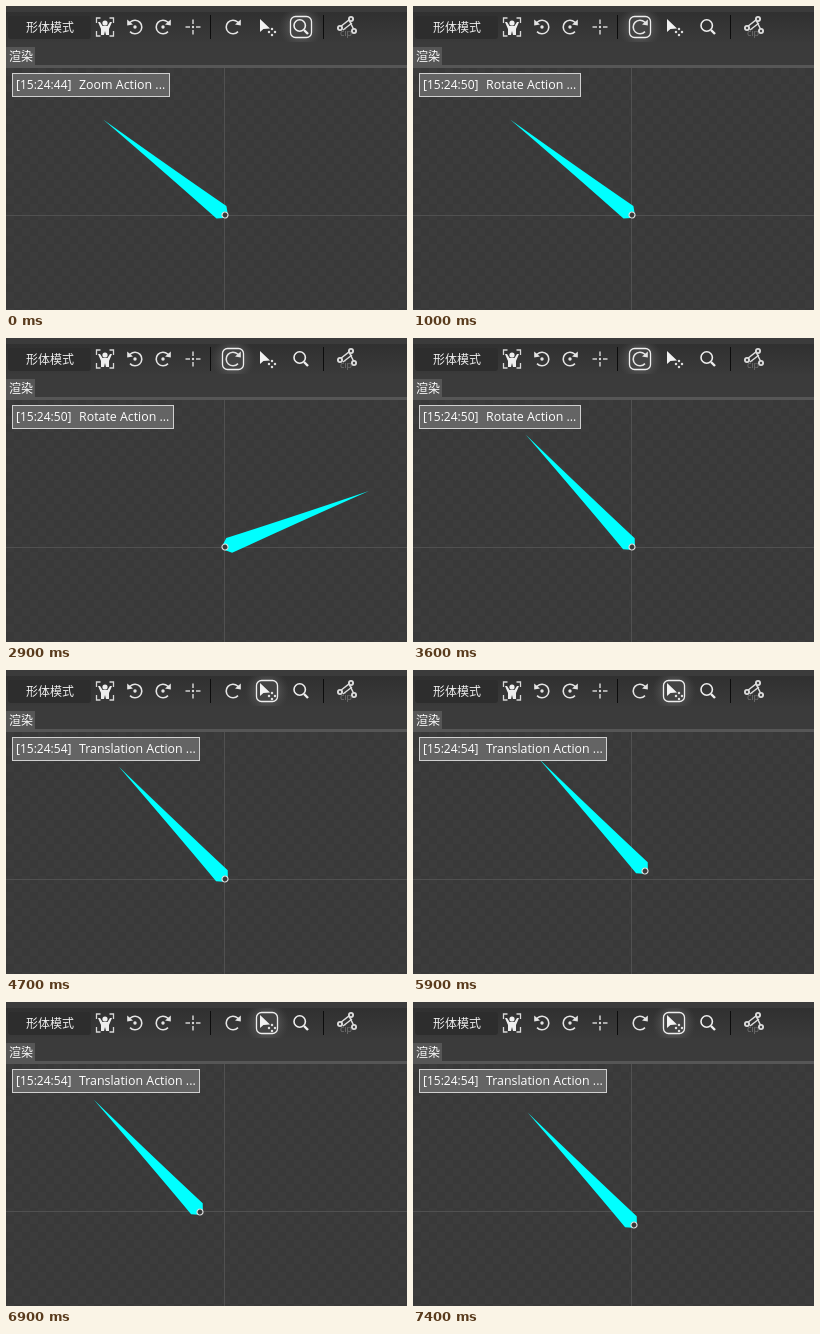
Animation, 401 px wide and 304 px high, one loop 8000 ms. Source, as an HTML page with a canvas:

```html
<!DOCTYPE html>
<html lang="zh">
<head>
<meta charset="utf-8">
<title>Bone tool</title>
<style>
html, body { margin: 0; width: 100%; height: 100%; overflow: hidden; background: #3a3a3a; }
canvas { display: block; }
</style>
</head>
<body>
<canvas id="stage" width="401" height="304"></canvas>
<script>
const ctx = document.getElementById('stage').getContext('2d');
const W = 401, H = 304, LOOP = 8000, STEP = 100;
const TOP = 62, BONE = 154.5;
const CJK = '12px "Noto Sans CJK SC", "Noto Sans CJK", sans-serif';

const modes = [
  { at: 0, stamp: '[15:24:44]', label: 'Zoom Action ...', right: 164, icon: 295 },
  { at: 1000, stamp: '[15:24:50]', label: 'Rotate Action ...', right: 168, icon: 227 },
  { at: 4700, stamp: '[15:24:54]', label: 'Translation Action ...', right: 194, icon: 261 }
];

// [time, degrees]
const turn = [[2100, 218.1], [2200, 236.4], [2900, 338.7], [3000, 338.7], [3600, 226.6]];

// [time, x, y]
const path = [
  [5800, 219, 209], [5900, 232, 201], [6000, 244, 190], [6100, 251, 175],
  [6200, 248, 159], [6300, 237, 148], [6400, 220, 143], [6500, 203, 148],
  [6600, 189, 162], [6700, 180, 182], [6800, 185, 200], [6900, 194, 210],
  [7000, 207, 212], [7100, 207, 212], [7400, 221, 223]
];

function sample(keys, t) {
  if (t <= keys[0][0]) return keys[0].slice(1);
  for (let i = 1; i < keys.length; i++) {
    const a = keys[i - 1], b = keys[i];
    if (t <= b[0]) {
      const k = (t - a[0]) / (b[0] - a[0]);
      return a.slice(1).map((v, j) => v + (b[j + 1] - v) * k);
    }
  }
  return keys[keys.length - 1].slice(1);
}

function rect(x, y, w, h, color) {
  ctx.fillStyle = color;
  ctx.fillRect(x, y, w, h);
}

function text(str, x, y, font, color = '#fff') {
  ctx.font = font;
  ctx.fillStyle = color;
  ctx.fillText(str, x, y);
}

function shape(points, fill, stroke) {
  ctx.beginPath();
  points.forEach(([x, y]) => ctx.lineTo(x, y));
  if (fill) { ctx.closePath(); ctx.fillStyle = fill; ctx.fill(); }
  else { ctx.strokeStyle = stroke; ctx.stroke(); }
}

function ring(x, y, r, color, from = 0, to = Math.PI * 2) {
  ctx.beginPath();
  ctx.arc(x, y, r, from, to);
  ctx.strokeStyle = color;
  ctx.stroke();
}

function dot(x, y, r, color) {
  ctx.beginPath();
  ctx.arc(x, y, r, 0, Math.PI * 2);
  ctx.fillStyle = color;
  ctx.fill();
}

function at(x, y, draw, flip = 1) {
  ctx.save();
  ctx.translate(x, y);
  ctx.scale(flip, 1);
  draw();
  ctx.restore();
}

function rotateIcon() {
  ctx.lineWidth = 1.6;
  ring(0, 0, 6.8, '#e4e4e4', 0.75, Math.PI * 1.78);
  shape([[7.8, -7.5], [7.8, -1.5], [2, -2.6]], '#e4e4e4');
}

function personIcon() {
  ctx.lineWidth = 1.3;
  for (const sx of [-1, 1]) for (const sy of [-1, 1])
    shape([[sx * 4.5, sy * 9], [sx * 8.5, sy * 9], [sx * 8.5, sy * 4]], null, '#d8d8d8');
  dot(0, -4, 2.6, '#eee');
  shape([[-7, -5], [-5, -5], [-2.5, -1], [2.5, -1], [5, -5], [7, -5], [4, 2],
    [4, 8], [1, 8], [0, 4], [-1, 8], [-4, 8], [-4, 2]], '#eee');
}

function crossIcon() {
  ctx.lineWidth = 1.4;
  for (let i = 0; i < 4; i++) {
    shape([[0, 3], [0, 7.5]], null, '#ddd');
    ctx.rotate(Math.PI / 2);
  }
  dot(0, 0, 1.2, '#ddd');
}

function moveIcon() {
  shape([[-7, -8], [-7, 5], [-3.6, 2], [3, 1.6]], '#f2f2f2');
  for (let i = 0; i < 4; i++) {
    const a = i * Math.PI / 2;
    dot(5 + 3 * Math.cos(a), 5 + 3 * Math.sin(a), 1.25, '#ddd');
  }
}

function zoomIcon() {
  ctx.lineWidth = 1.6;
  ring(-1.3, -1.5, 5.7, '#eee');
  ctx.lineWidth = 2.4;
  shape([[3, 3], [7, 7]], null, '#eee');
}

function boneIcon() {
  ctx.lineWidth = 1.5;
  shape([[-7, 1], [2, -6], [7, 4]], null, '#ddd');
  shape([[-4, 4], [5, -3]], null, '#ddd');
  for (const [x, y] of [[-7, 2], [4, -7], [7, 5]]) {
    dot(x, y, 3, '#ddd');
    dot(x, y, 1.2, '#444');
  }
  text('cip', -7, 10, '9px "Open Sans", sans-serif', '#777');
}

function highlight(x) {
  const glow = ctx.createRadialGradient(x, 21, 8, x, 21, 22);
  glow.addColorStop(0, 'rgba(120,120,120,.55)');
  glow.addColorStop(1, 'rgba(90,90,90,0)');
  rect(x - 22, 6, 44, 30, glow);
  ctx.beginPath();
  ctx.roundRect(x - 10.5, 10.5, 21, 21, 5);
  ctx.fillStyle = '#444';
  ctx.fill();
  ctx.lineWidth = 1.3;
  ctx.strokeStyle = '#eee';
  ctx.stroke();
}

function toolbar(active) {
  rect(0, 0, W, TOP, '#3b3b3b');
  const shade = ctx.createLinearGradient(0, 6, 0, 36);
  shade.addColorStop(0, '#303030');
  shade.addColorStop(1, '#3a3a3a');
  rect(0, 6, W, 30, shade);
  ctx.beginPath();
  ctx.roundRect(2, 10, 83, 23, 3);
  ctx.fillStyle = '#2d2d2d';
  ctx.fill();
  text('形体模式', 20, 26, CJK, '#f0f0f0');

  highlight(active);
  at(99, 21, personIcon);
  at(129, 21, rotateIcon, -1);
  dot(129, 21, 1.7, '#e4e4e4');
  at(157, 21, rotateIcon);
  dot(157, 21, 1.7, '#e4e4e4');
  at(187, 21, crossIcon);
  at(227, 21, rotateIcon);
  at(261, 21, moveIcon);
  at(295, 21, zoomIcon);
  at(341, 20, boneIcon);
  rect(204, 9, 1, 24, '#0c0c0c');
  rect(317, 9, 1, 24, '#0c0c0c');

  rect(0, 41, 29, 18, '#565656');
  text('渲染', 3, 54.5, CJK);
  rect(0, 59, W, 3, '#565656');
}

function viewport() {
  rect(0, TOP, W, H - TOP, '#393939');
  for (let y = TOP, row = 0; y < H; y += 8, row++)
    for (let x = row % 2 * 8; x < W; x += 16) rect(x, y, 8, 8, '#3c3c3c');
  rect(0, 209, W, 1, '#505050');
  rect(218, TOP, 1, H - TOP, '#505050');
}

function bone(x, y, degrees) {
  ctx.save();
  ctx.beginPath();
  ctx.rect(0, TOP, W, H - TOP);
  ctx.clip();
  ctx.translate(x, y);
  ctx.rotate(degrees * Math.PI / 180);
  ctx.beginPath();
  ctx.moveTo(-1, -3);
  ctx.lineTo(4.5, -8);
  ctx.quadraticCurveTo(62, -4.3, BONE, 0);
  ctx.quadraticCurveTo(62, 4.3, 4.5, 8);
  ctx.lineTo(-1, 3);
  ctx.closePath();
  ctx.fillStyle = '#0ff';
  ctx.fill();
  dot(0, 0, 3, '#3a3a3a');
  ctx.lineWidth = 1.2;
  ring(0, 0, 3, '#ddd');
  ctx.restore();
}

function tooltip({ stamp, label, right }) {
  rect(6, 67, right - 6, 24, '#d0d0d0');
  rect(7, 68, right - 8, 22, '#646464');
  text(stamp, 10, 83, '12px "Open Sans", "Noto Sans", sans-serif');
  text(label, 73, 83, '12.4px "Open Sans", "Noto Sans", sans-serif');
}

function draw(now) {
  const t = Math.floor(now % LOOP / STEP) * STEP;
  const mode = modes.filter(m => t >= m.at).pop();
  const [x, y] = sample(path, t);
  viewport();
  bone(x, y, sample(turn, t)[0]);
  toolbar(mode.icon);
  tooltip(mode);
}

let start;
function frame(now) {
  start ??= now;
  draw(now - start);
  requestAnimationFrame(frame);
}
draw(0);
requestAnimationFrame(frame);
</script>
</body>
</html>
```
